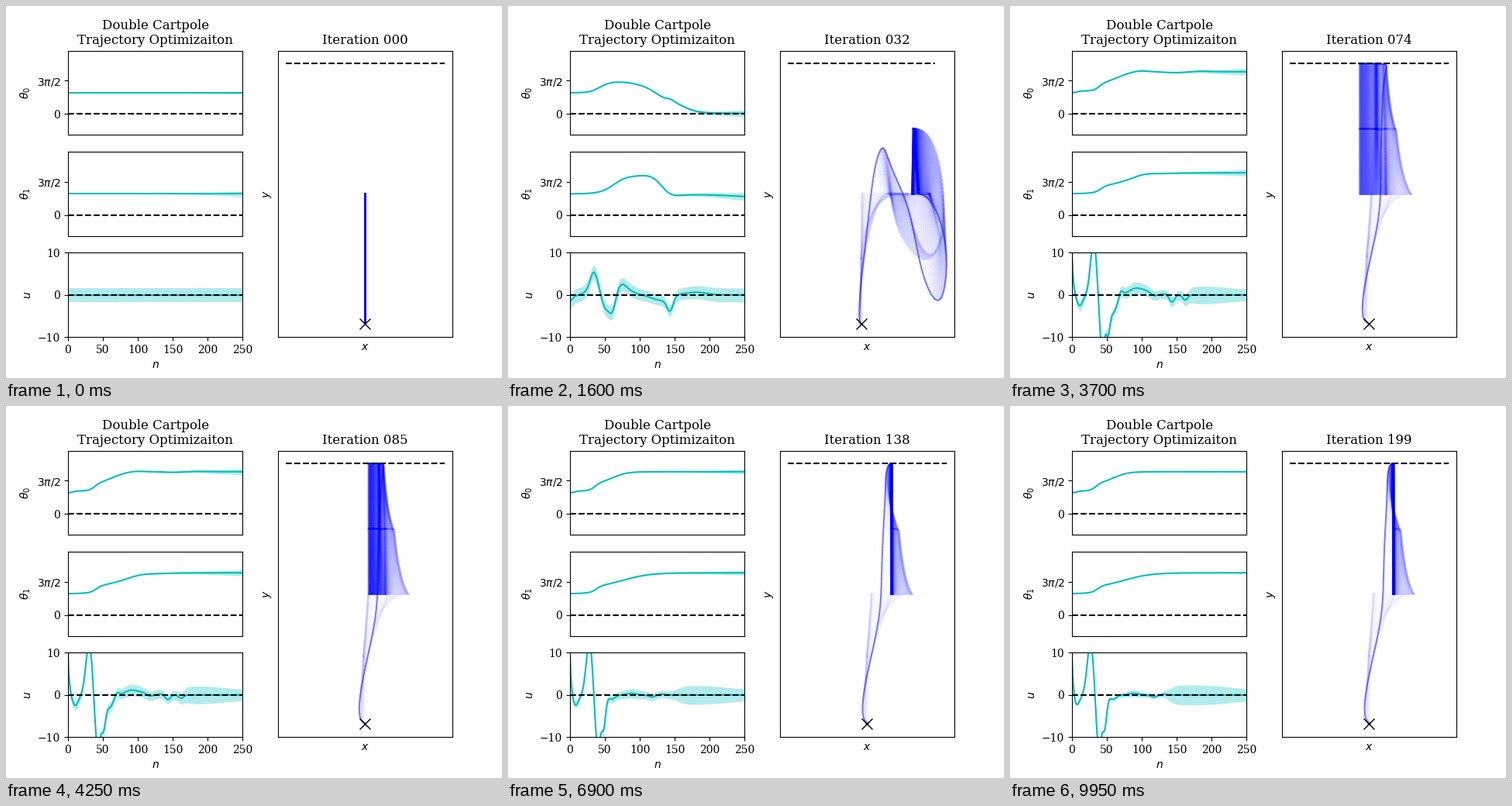
Animation, 640 px wide and 480 px high, one loop 10 s. Source, as a matplotlib script:

```python
import numpy as np
import matplotlib.pyplot as plt
from matplotlib.animation import FuncAnimation
from matplotlib.collections import LineCollection

plt.rcParams["font.family"] = "DejaVu Serif"
PI = np.pi
FRAMES = 200
N = np.arange(251.0)


def rise(mid, width, n=N):
    return .5 + .5 * np.tanh((n - mid) / width)


def bump(mid, width, n=N):
    return np.exp(-((n - mid) / width) ** 2)


def flare(width):
    """Half width of an angle band, opening towards the end."""
    return width * np.clip((N - 60) / 190, 0, 1) ** 2


def late_band(base, peak, mid):
    """Half width of the control band once the swing-up is found."""
    return (base + .35 * bump(90, 18) + (peak - base) * rise(mid, 10)
            - .45 * peak * rise(225, 30))


# A plan holds: theta0, theta1, u, cart x, and half widths of the three bands.
def hanging():
    still = 0 * N
    return np.array([still + PI, still + PI, still, still,
                     flare(.2), flare(.38), still + 1.7])


def detour():
    """The second pole swings back the short way, the cart overshoots."""
    th0 = (PI + 1.35 * rise(40, 12) - 1.95 * rise(103, 30)
           - 2.4 * rise(164, 20) + .45 * bump(144, 8))
    th1 = PI + 2.4 * rise(65, 17) - 4.9 * rise(132, 14) - .5 * rise(225, 25)
    u = (-2.8 * bump(0, 5) + 2.9 * bump(35, 14) - 2.9 * bump(60, 8)
         + 1.5 * bump(77, 14) - 2 * bump(130, 12) - 4.8 * bump(143, 7)
         + 1.1 * bump(180, 22))
    x = 3.6 * rise(56, 16) + 2.9 * rise(115, 14) - 2.3 * rise(175, 28)
    return np.array([th0, th1, u, x, flare(.5), flare(.65),
                     1.7 - .35 * bump(145, 40)])


def fold():
    """The first pole returns, the second goes over the top."""
    th0 = PI + 2.35 * rise(47, 17) - 4.4 * rise(124, 18) - 1.1 * rise(160, 27)
    th1 = PI + 3.2 * rise(59, 21) + .25 * bump(112, 14) - .8 * bump(142, 18)
    u = (.7 * bump(0, 4) - .4 * bump(8, 6) + 8.9 * bump(34, 7) - 7.6 * bump(50, 7)
         - 6 * bump(60, 6) + 4 * bump(74, 9) + .9 * bump(88, 10)
         - .9 * bump(116, 10) - 1.7 * bump(143, 5))
    x = 2.35 * rise(40, 11) + .25 * bump(60, 10)
    return np.array([th0, th1, u, x, flare(.5), flare(.5),
                     1.6 - .6 * bump(120, 40)])


def swing_up(shift, end, band, width, lead=.28):
    """Both poles go over the top; shift makes the whole plan start earlier."""
    n = N + shift
    th0 = PI + .25 * rise(7, 4) + 1.15 * rise(37, 8, n) + 1.74 * rise(63, 20, n)
    th1 = PI + .95 * rise(39, 8, n) + 2.19 * rise(78, 38, n)
    u = (10 * np.exp(-N / 2) - 2.6 * bump(9, 6, n) + 12.5 * bump(29, 6.5, n)
         - 13 * bump(41, 5.5, n) - 7 * bump(49.5, 4, n) - bump(61, 7, n)
         + .4 * bump(88, 9) - .5 * bump(117, 6) + .2 * bump(132, 5))
    x = (lead * rise(4, 2) + 2.75 * rise(39, 7, n)
         - (2.75 + lead - end) * rise(79, 23, n))
    return np.array([th0, th1, u, x, flare(width), flare(width), band])


def drift():
    """An early swing-up that wobbles and lets the cart roll back."""
    plan = swing_up(-2, 1, late_band(1.1, 2.2, 168), .5, lead=.15)
    plan[0] += .17 * bump(97, 14) - .14 * bump(147, 20) + .08 * bump(185, 15)
    plan[1] += .25 * bump(103, 20)
    plan[2] += (1.2 * bump(70, 4) - 3.5 * bump(58, 7) + 1.4 * bump(97, 18)
                - 1.7 * bump(143, 5) - 1.2 * bump(162, 5))
    plan[3] -= 1.6 * np.clip((N - 130) / 120, 0, 1)
    return plan


KEYS = [
    (0, hanging()), (22, detour()), (46, fold()), (74, drift()),
    (104, swing_up(0, 1.64, late_band(1, 2.2, 163), .35)),
    (138, swing_up(1.3, 1.56, late_band(.8, 2.3, 155), .35)),
    (199, swing_up(2.6, 1.54, late_band(.4, 2.4, 139), .1)),
]


def state(k):
    for (k0, a), (k1, b) in zip(KEYS, KEYS[1:]):
        if k <= k1:
            return a + (b - a) * (k - k0) / (k1 - k0)


fig = plt.figure(figsize=(6.4, 4.8), dpi=100)
grid = fig.add_gridspec(3, 2)
plots = [fig.add_subplot(grid[r, 0]) for r in range(3)]
scene = fig.add_subplot(grid[:, 1])

lines, bands = [], []
for ax, label in zip(plots, (r"$\theta_0$", r"$\theta_1$", "$u$")):
    bands.append(ax.fill_between(N, 0 * N, 0 * N, color="c", alpha=.3, lw=0))
    lines += ax.plot(N, 0 * N, "c")
    ax.plot([0, 250], [0, 0], "k--")
    ax.set(xlim=(0, 250), ylim=(-PI, 3 * PI), xticks=[], ylabel=label)
    ax.set_yticks([0, 4.93], ["0", r"$3\pi/2$"])
plots[0].set_title("Double Cartpole\nTrajectory Optimizaiton")
plots[2].set(ylim=(-10, 10), xticks=range(0, 251, 50), xlabel="$n$")
plots[2].set_yticks([-10, 0, 10], ["\u221210", "0", "10"])

# Poles grow more opaque along the plan.
shades = np.zeros((2 * len(N), 4))
shades[:, 2] = 1
shades[:, 3] = np.repeat(.12 * N / N[-1], 2)
poles = LineCollection([], colors=shades, linewidths=2, capstyle="projecting")
scene.add_collection(poles, autolim=False)
trace, = scene.plot([], [], "b", alpha=.5)
scene.plot([-5, 5], [2, 2], "k--")
scene.plot([0], [-2], "kx", ms=10)
scene.set(ylim=(-2.2, 2.2), xticks=[], yticks=[], xlabel="$x$", ylabel="$y$")
title = scene.set_title("Iteration 000")


def update(k):
    th0, th1, u, x, *widths = state(k)
    for line, band, mid, w in zip(lines, bands, (th0, th1, u), widths):
        line.set_ydata(mid)
        edge = np.r_[mid - w, (mid + w)[::-1]]
        band.set_verts([np.c_[np.r_[N, N[::-1]], edge]])

    cart = np.c_[x, 0 * x]
    joint = cart + np.c_[np.sin(th0), np.cos(th0)]
    tip = joint + np.c_[np.sin(th1), np.cos(th1)]
    links = np.stack([cart, joint, joint, tip], axis=1)
    poles.set_segments(links.reshape(-1, 2, 2))
    trace.set_data(tip.T)

    xs = np.r_[-5, 5, x, joint[:, 0], tip[:, 0]]
    pad = .05 * np.ptp(xs)
    scene.set_xlim(xs.min() - pad, xs.max() + pad)
    title.set_text(f"Iteration {k:03d}")


anim = FuncAnimation(fig, update, frames=FRAMES, interval=50, repeat=True,
                     repeat_delay=0, init_func=lambda: update(0))
plt.show()
```
